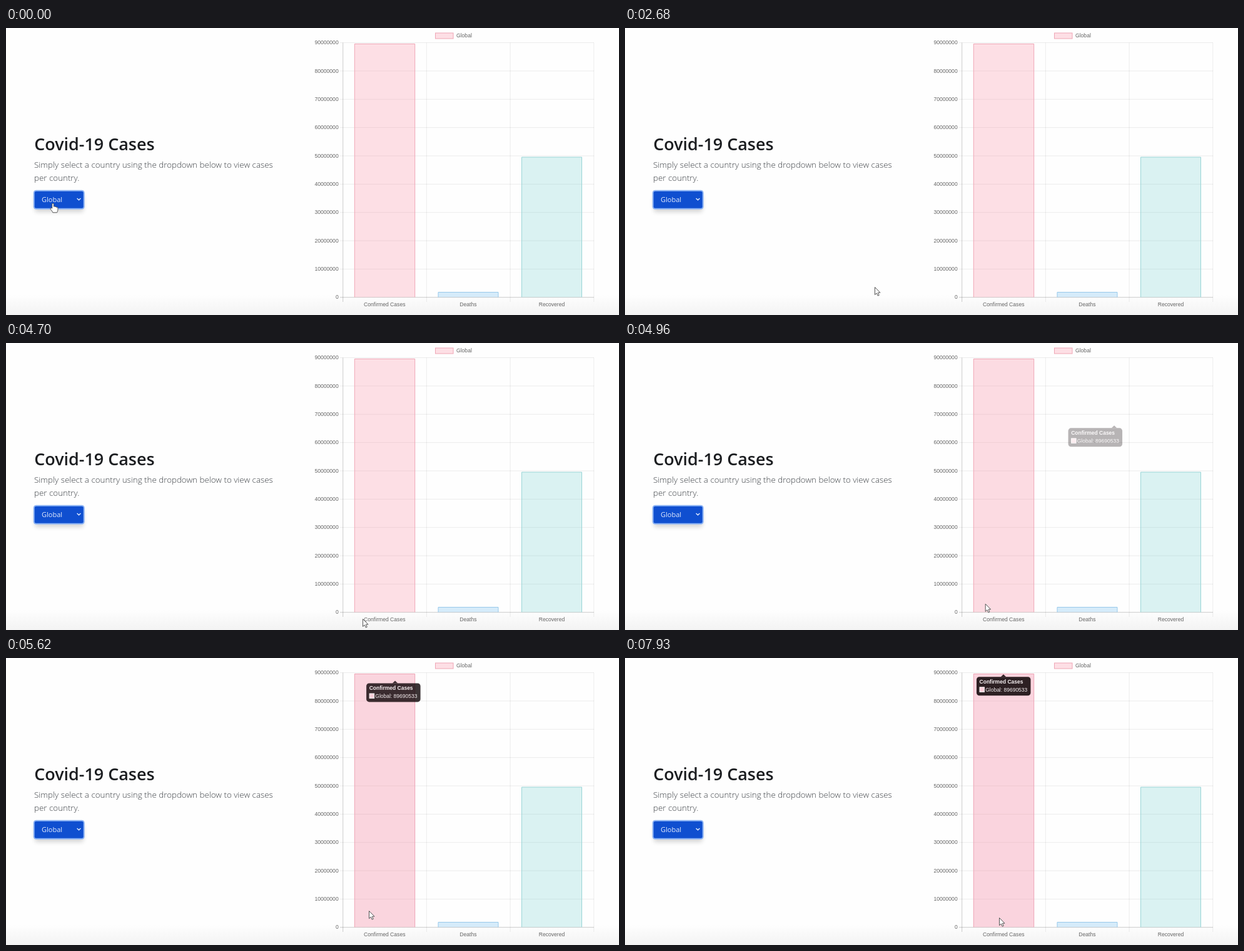
Animation of 980 by 460 pixels, one loop 8000 ms. Source, as an HTML page:

```html
<!DOCTYPE html>
<html lang="en">
<head>
<meta charset="utf-8">
<title>Covid-19 Cases</title>
<style>
  html, body { margin: 0; width: 100%; height: 100%; overflow: hidden; background: #fefefe; }
  svg { display: block; width: 100vw; height: 100vh; }
  .page { font-family: "Open Sans", "Noto Sans", sans-serif; }
  .chart { font: 8.6px "Liberation Sans", Arial, sans-serif; fill: #666; }
  .title { font-size: 26.9px; font-weight: 600; fill: #1b1d20; }
  .lead { font-size: 13.37px; font-weight: 300; fill: #3c4045; }
  .choice { font-size: 11px; fill: #e4ecfd; }
  .grid line { stroke: #000; stroke-opacity: .075; }
  .grid .axis { stroke-opacity: .2; }
  .pink { fill: rgb(250 99 132 / .2); stroke: #efa6b5; }
  .blue { fill: rgb(54 162 235 / .2); stroke: #98c9ea; }
  .teal { fill: rgb(75 192 192 / .2); stroke: #9ad5d7; }
  .tip text { font-size: 8.5px; fill: #f4eef0; }
  .tip .head { font-weight: 700; }
  .cursor { fill: #fff; stroke: #555; stroke-linejoin: round; }
</style>
</head>
<body>
<svg viewBox="0 0 980 460">
  <defs>
    <linearGradient id="floor" x1="0" y1="0" x2="0" y2="1">
      <stop offset="0" stop-color="#fefefe"/>
      <stop offset="1" stop-color="#f3f3f3"/>
    </linearGradient>
    <filter id="soft" x="-30%" y="-60%" width="160%" height="220%">
      <feGaussianBlur stdDeviation="3.5"/>
    </filter>
    <filter id="edge" x="-10%" y="-20%" width="120%" height="140%">
      <feGaussianBlur stdDeviation=".6"/>
    </filter>
  </defs>
  <rect width="980" height="460" fill="#fefefe"/>
  <rect y="428" width="980" height="32" fill="url(#floor)"/>

  <g class="page">
    <text class="title" x="45.3" y="195.5">Covid-19 Cases</text>
    <text class="lead" x="45" y="223.5">Simply select a country using the dropdown below to view cases</text>
    <text class="lead" x="45" y="244.7">per country.</text>
    <rect x="46" y="267" width="78" height="28" rx="4" fill="#000" opacity=".16" filter="url(#soft)"/>
    <g filter="url(#edge)">
      <rect x="43.7" y="259.7" width="82" height="31" rx="4.5" fill="#8db4f5"/>
      <rect x="45.7" y="261.7" width="78" height="27" rx="2.5" fill="#0f4fd0"/>
    </g>
    <text class="choice" x="57" y="279">Global</text>
    <path d="M113.6 273l2.9 2.8 2.9-2.8" fill="none" stroke="#e4ecfd" stroke-width="1.4"/>
  </g>

  <g class="chart">
    <g class="grid" id="grid"></g>
    <rect class="pink" x="686.5" y="8" width="28.5" height="9"/>
    <text x="720" y="15">Global</text>
    <path class="pink" d="M557.3 431.5V25.5H653.7V431.5"/>
    <rect id="glow" x="557.5" y="25.5" width="96" height="406" fill="#e07a98" opacity="0"/>
    <path class="blue" d="M691 431.5V423.5H787V431.5"/>
    <path class="teal" d="M824.5 431.5V207H920.5V431.5"/>
    <g class="tip" id="tip" opacity="0">
      <path id="caret" fill="#12070a" fill-opacity=".88"/>
      <g id="box">
        <rect width="86.5" height="30" rx="4.5" fill="#12070a" fill-opacity=".88"/>
        <text class="head" x="4.6" y="10.4">Confirmed Cases</text>
        <rect x="5" y="16.6" width="7.6" height="7.6" fill="#fbd0da" stroke="#fff" stroke-width=".9"/>
        <text x="14.2" y="23.4">Global: 89690533</text>
      </g>
    </g>
  </g>

  <g id="pointer" class="cursor">
    <path id="arrow" d="M.5.5V12.6L3.3 10 5.2 14.2 7.2 13.3 5.3 9.2H9Z"/>
    <path id="hand" d="M-1.3 8V.8Q0-.9 1.3.8V5.2Q2.8 4.4 3.6 5.6 5 5 5.8 6.3 7.6 5.9 7.9 7.6V10.6Q7.8 12.6 6.6 14.8H-.2Q-1 12.4-3.8 9.4-4.4 7.6-2.8 7.4Z"/>
  </g>
</svg>
<script>
const LOOP = 8000;
const HOVER = { start: 4800, length: 1650 };

// [time, x, y] of the pointer tip
const PATH = [
  [1120, 75, 281], [1340, 137, 326], [1560, 207, 388], [1780, 272, 430],
  [1900, 312, 438], [2000, 314, 438], [2300, 355, 432], [2680, 399, 415],
  [2820, 400, 414], [3140, 404, 412], [3360, 404, 412], [3940, 480, 446],
  [4280, 482, 446], [4700, 570, 442], [4800, 572, 432], [5060, 578, 409],
  [5280, 580, 405], [7760, 580, 405], [7930, 598, 416]
];

const byId = id => document.getElementById(id);
const [grid, glow, tip, caret, box, pointer, arrow, hand] =
  ["grid", "glow", "tip", "caret", "box", "pointer", "arrow", "hand"].map(byId);

function buildGrid() {
  let marks = "";
  const line = (x1, y1, x2, y2, name = "") =>
    marks += `<line x1="${x1}" y1="${y1}" x2="${x2}" y2="${y2}" class="${name}"/>`;
  const label = (x, y, anchor, text) =>
    marks += `<text x="${x}" y="${y}" text-anchor="${anchor}">${text}</text>`;
  for (let i = 0; i < 10; i++) {
    const y = 431.7 - i * 45.35;
    line(534, y, 940, y, i ? "" : "axis");
    label(531.7, y + 2.7, "end", i * 1e7);
  }
  for (let i = 0; i < 4; i++) {
    const x = 538.7 + i * 133.7;
    line(x, 23.5, x, 439, i ? "" : "axis");
  }
  ["Confirmed Cases", "Deaths", "Recovered"].forEach((name, i) =>
    label(605.3 + i * 133.6, 446.3, "middle", name));
  grid.innerHTML = marks;
}

function pointerAt(t) {
  const next = PATH.findIndex(p => p[0] > t);
  if (next === 0) return PATH[0].slice(1);
  if (next < 0) return PATH[PATH.length - 1].slice(1);
  const [t0, x0, y0] = PATH[next - 1];
  const [t1, x1, y1] = PATH[next];
  const k = (t - t0) / (t1 - t0);
  return [x0 + (x1 - x0) * k, y0 + (y1 - y0) * k];
}

function draw(t) {
  const [x, y] = pointerAt(t);
  const isHand = y < 290;
  pointer.setAttribute("transform", `translate(${x} ${y})`);
  hand.style.display = isHand ? "" : "none";
  arrow.style.display = isHand ? "none" : "";

  // The tooltip eases out (quartic) from the Recovered bar
  const progress = Math.min(1, Math.max(0, (t - HOVER.start) / HOVER.length));
  const left = (1 - progress) ** 4;
  const top = 30.2 + 160 * left;
  tip.setAttribute("opacity", 1 - left);
  glow.setAttribute("opacity", .1 * (1 - left));
  box.setAttribute("transform", `translate(${562 + 221 * left} ${top})`);
  caret.setAttribute("d", `M${605 + 267 * left} ${top - 4}l4.3 4h-8.6z`);
}

buildGrid();
const begin = performance.now();
function tick() {
  draw((performance.now() - begin) % LOOP);
  requestAnimationFrame(tick);
}
tick();
</script>
</body>
</html>
```
